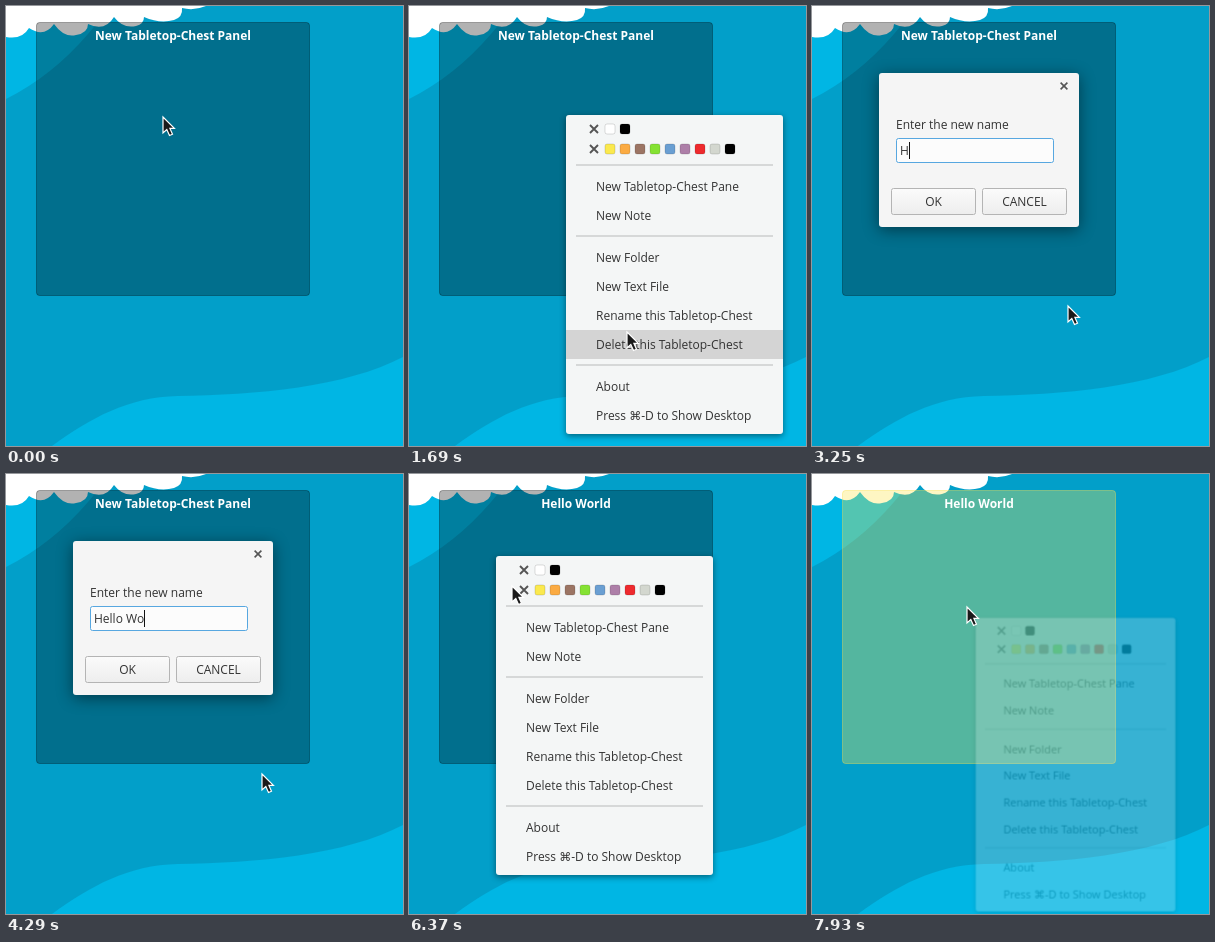
Write an HTML page that moves like this. It is 397x440 px and loops after 8000 ms.

```html
<!DOCTYPE html>
<html lang="en">
<head>
<meta charset="utf-8">
<title>Renaming a desktop panel</title>
<style>
html, body { margin: 0; width: 100%; height: 100%; overflow: hidden; background: #029fc9; }
svg { display: block; width: 397px; height: 440px; }
text { font: 12px "Open Sans", "DejaVu Sans", sans-serif; fill: #333; }
.mid { text-anchor: middle; }
.title { font-weight: 700; fill: #fff; }
.line { fill: #d6d8d8; }
.cross { stroke: #555; stroke-width: 1.9; fill: none; }
.swatch rect { width: 10px; height: 10px; rx: 2px; stroke: #0002; }
.button { fill: url(#face); stroke: #b4b4b4; }

/* Everything moves in hard steps on one 8 s clock. */
.anim { animation: 8s step-end infinite; }
#cursor { animation-name: cursor; }
#menu { animation-name: menu; transform-origin: 108.5px 159.5px; }
#hover { animation-name: hover; }
#dialog { animation-name: dialog; transform-origin: 167px 144px; }
#panel { animation-name: panel; }
#oldTitle { animation-name: oldTitle; }
#newTitle { animation-name: newTitle; }
#selected { animation-name: selected; }
#typed { animation-name: typed; }
#caret { animation-name: caret; }

@keyframes cursor {
  0% { transform: translate(157px, 111px); }
  9.75% { transform: translate(160px, 140px); }
  11.375% { transform: translate(168px, 180px); }
  13% { transform: translate(178px, 219px); }
  14.625% { transform: translate(187px, 242px); }
  16.25% { transform: translate(195px, 268px); }
  17.875% { transform: translate(203px, 286px); }
  19.5% { transform: translate(211px, 306px); }
  21.125% { transform: translate(218px, 326px); }
  22.75% { transform: translate(221px, 320px); }
  24.375% { transform: translate(221px, 313px); }
  30.875% { transform: translate(241px, 306px); }
  32.5% { transform: translate(256px, 300px); }
  68.25% { transform: translate(126px, 143px); }
  69.875% { transform: translate(80px, 82px); }
  71.5% { transform: translate(52px, 46px); }
  73.125% { transform: translate(87px, 84px); }
  79.625% { transform: translate(103px, 112px); }
  81.25% { transform: translate(112px, 115px); }
  82.875% { transform: translate(122px, 116px); }
  84.5% { transform: translate(128px, 115px); }
  92.625% { transform: translate(131px, 118px); }
  94.25% { transform: translate(139px, 124px); }
  95.875% { transform: translate(150px, 131px); }
  97.5% { transform: translate(155px, 133px); }
}
@keyframes menu {
  0% { opacity: 0; transform: translate(157px, 109px); }
  4.875% { opacity: .22; transform: translate(157px, 109px) scale(.92); }
  6.5% { opacity: .8; transform: translate(157px, 109px) scale(.985); }
  8.125% { opacity: 1; transform: translate(157px, 109px); }
  27.625% { opacity: .35; }
  29.25% { opacity: 0; }
  74.75% { opacity: .22; transform: translate(87px, 82px) scale(.92); }
  76.375% { opacity: .8; transform: translate(87px, 82px) scale(.985); }
  78% { opacity: 1; transform: translate(87px, 82px); }
  87.75% { opacity: .35; }
  89.375% { opacity: 0; }
  99.125% { opacity: .22; transform: translate(155px, 131px) scale(.92); }
}
@keyframes hover {
  0% { opacity: 0; transform: translateY(57px); }
  11.375% { opacity: 1; }
  13% { transform: translateY(86px); }
  14.625% { transform: translateY(128px); }
  16.25% { transform: translateY(157px); }
  19.5% { transform: translateY(186px); }
  21.125% { transform: translateY(215px); }
  22.75% { transform: translateY(186px); }
  29.25% { opacity: 0; }
}
@keyframes dialog {
  0% { opacity: 0; transform: scale(.97); }
  29.25% { opacity: .69; transform: scale(.97); }
  30.875% { opacity: .96; transform: scale(.997); }
  32.5% { opacity: 1; transform: none; }
  60.125% { opacity: 0; }
}
@keyframes panel {
  0% { fill: rgba(0, 0, 0, .3); stroke: rgba(0, 0, 0, .3); }
  87.75% { fill: rgba(251, 226, 75, .33); stroke: rgba(251, 226, 75, .4); }
}
@keyframes oldTitle { 0% { opacity: 1; } 60.125% { opacity: 0; } }
@keyframes newTitle { 0% { opacity: 0; } 60.125% { opacity: 1; } }
@keyframes selected { 0% { opacity: 1; } 40.625% { opacity: 0; } }
@keyframes typed { 0% { opacity: 0; } 40.625% { opacity: 1; } }
@keyframes caret {
  0% { transform: none; }
  40.625% { transform: translateX(9px); }
  42.25% { transform: translateX(16px); }
  43.875% { transform: translateX(19px); }
  45.5% { transform: translateX(22px); }
  47.125% { transform: translateX(29px); }
  48.75% { transform: translateX(32px); }
  50.375% { transform: translateX(43px); }
  53.625% { transform: translateX(50px); }
  55.25% { transform: translateX(55px); }
  56.875% { transform: translateX(66px); }
}
</style>
</head>
<body>
<svg viewBox="0 0 397 440">
  <defs>
    <linearGradient id="face" x2="0" y2="1">
      <stop stop-color="#fbfbfb"/><stop offset="1" stop-color="#ededed"/>
    </linearGradient>
    <path id="x" class="cross" d="M-4 -4L4 4M4 -4L-4 4"/>
  </defs>

  <!-- wallpaper -->
  <rect width="397" height="440" fill="#029fc9"/>
  <path fill="#00b6e4" d="M0 93Q46 70 82 28Q96 12 102 0H0Z"/>
  <path fill="#00b6e4" d="M46 440C85 412 122 391 172 390C250 389 340 381 397 351V440Z"/>
  <path fill="#fff" d="M0 0V31Q16 34 23 22Q38 32 48 18Q58 32 70 29Q82 27 82 18Q99 26 108 11Q117 23 130 20Q138 18 138 11Q154 18 168 14Q177 11 176 2Q188 5 200 0Z"/>

  <!-- panel -->
  <rect id="panel" class="anim" x="30.5" y="16.5" width="273" height="273" rx="3"/>
  <text id="oldTitle" class="anim title mid" x="167" y="34">New Tabletop-Chest Panel</text>
  <text id="newTitle" class="anim title mid" x="167" y="34">Hello World</text>

  <!-- rename dialog -->
  <g id="dialog" class="anim">
    <rect x="67" y="67" width="200" height="154" rx="3" fill="#f5f5f5" style="filter: drop-shadow(0 3px 8px #0007)"/>
    <use href="#x" transform="translate(252 80) scale(.85)"/>
    <text x="84" y="123">Enter the new name</text>
    <rect x="84.5" y="132.5" width="157" height="24" rx="2" fill="#fcfcfc" stroke="#57a7e0"/>
    <g id="selected" class="anim">
      <rect x="88" y="136" width="147" height="17" fill="#3d94d9"/>
      <text x="88" y="149" style="fill: #fff">New Tabletop-Chest Panel</text>
    </g>
    <g id="typed" class="anim">
      <text x="88" y="149">Hello World</text>
      <g id="caret" class="anim">
        <rect x="88" y="135" width="70" height="19" fill="#fcfcfc"/>
        <rect x="88" y="136" width="1" height="17" fill="#111"/>
      </g>
    </g>
    <rect class="button" x="79.500" y="182.500" width="84" height="26" rx="2"/>
    <rect class="button" x="170.500" y="182.500" width="84" height="26" rx="2"/>
    <text class="mid" x="121.500" y="200">OK</text>
    <text class="mid" x="212.500" y="200">CANCEL</text>
  </g>

  <!-- context menu -->
  <g id="menu" class="anim">
    <rect width="217" height="319" rx="3" fill="#f4f6f6" style="filter: drop-shadow(0 2px 3px #0007)"/>
    <rect id="hover" class="anim" width="217" height="29" fill="#d4d4d4"/>
    <use href="#x" x="28" y="14"/>
    <use href="#x" x="28" y="34"/>
    <g class="swatch">
      <rect x="39" y="9" fill="#fff"/>
      <rect x="54" y="9" fill="#000"/>
      <rect x="39" y="29" fill="#fbe94e"/>
      <rect x="54" y="29" fill="#fbab42"/>
      <rect x="69" y="29" fill="#9c7564"/>
      <rect x="84" y="29" fill="#85e233"/>
      <rect x="99" y="29" fill="#6a9fd2"/>
      <rect x="114" y="29" fill="#ad7fa8"/>
      <rect x="129" y="29" fill="#ee2a2e"/>
      <rect x="144" y="29" fill="#d3d7cf"/>
      <rect x="159" y="29" fill="#000"/>
    </g>
    <rect class="line" x="10" y="49" width="197" height="2"/>
    <text x="30" y="76">New Tabletop-Chest Pane</text>
    <text x="30" y="105">New Note</text>
    <rect class="line" x="10" y="120" width="197" height="2"/>
    <text x="30" y="147">New Folder</text>
    <text x="30" y="176">New Text File</text>
    <text x="30" y="205">Rename this Tabletop-Chest</text>
    <text x="30" y="234">Delete this Tabletop-Chest</text>
    <rect class="line" x="10" y="249" width="197" height="2"/>
    <text x="30" y="276">About</text>
    <text x="30" y="305">Press ⌘-D to Show Desktop</text>
  </g>

  <g id="cursor" class="anim">
    <path d="M0 0V16L3.800 12.500L6.500 18.500L9.500 17.200L6.900 11.400H11.400Z" fill="#1a1a1a" stroke="#fff" stroke-width="1.200"/>
  </g>
</svg>
</body>
</html>
```
